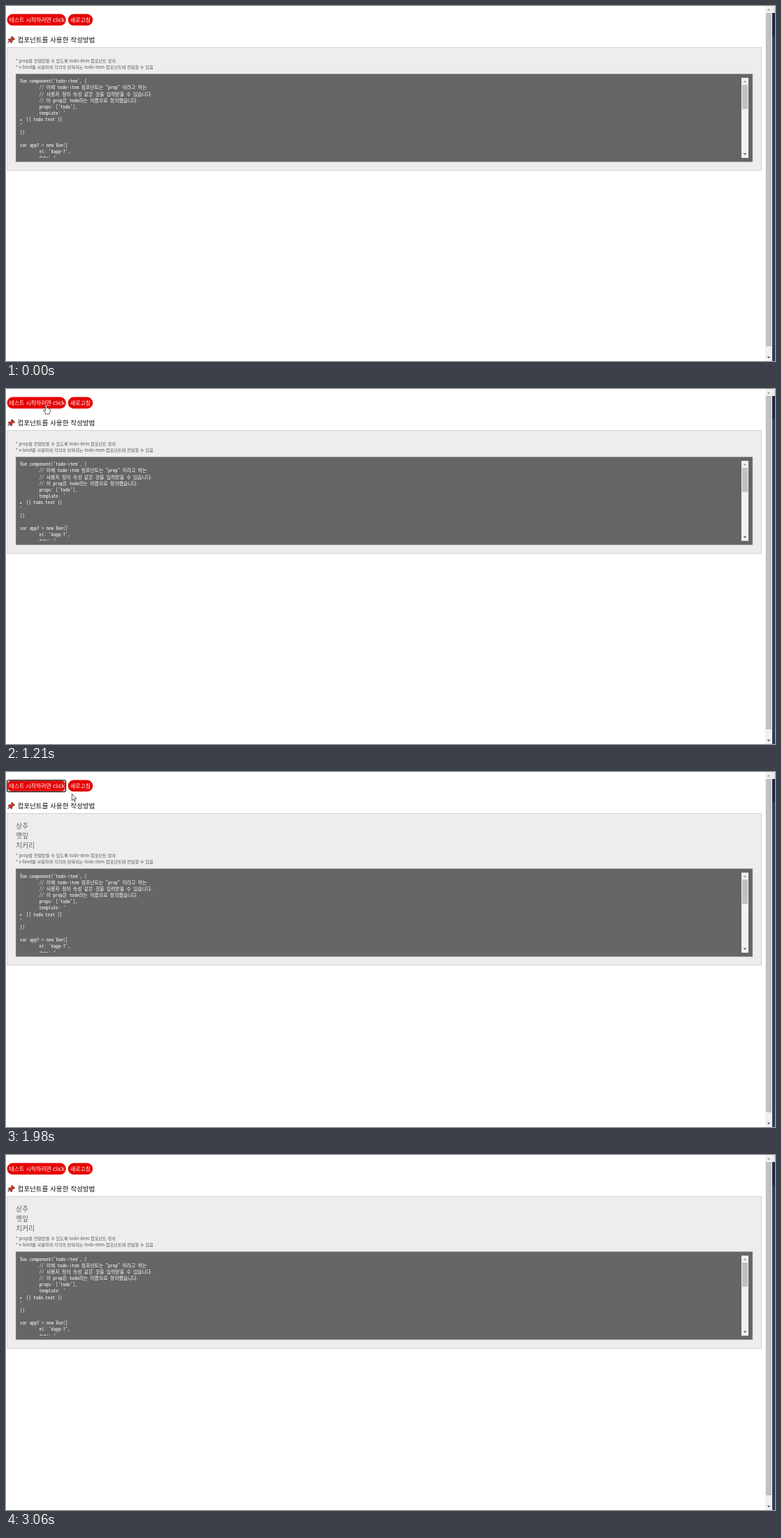
Animation of 1100 by 509 pixels, one loop 3140 ms. Source, as an HTML page:

```html
<!DOCTYPE html>
<html lang="ko">
<head>
<meta charset="utf-8">
<style>
html, body { margin: 0; width: 100%; height: 100%; overflow: hidden; background: #fff; }
svg { display: block; width: 100vw; height: 100vh; }
text { font-family: "Noto Sans CJK KR", "Noto Sans CJK", sans-serif; white-space: pre; }
.label { font-size: 7.9px; fill: #fff; }
.note { font-size: 6.2px; fill: #555; }
.item { font-size: 9.8px; fill: #666; }
.code { font-family: "Noto Sans Mono CJK KR", "Noto Sans CJK KR", monospace; font-size: 6.84px; fill: #fff; }
.track { fill: #f1f1f1; }
.thumb { fill: #c1c1c1; }
.cursor { fill: #fff; stroke: #222; stroke-width: .75; stroke-linejoin: round; }
</style>
</head>
<body>
<svg viewBox="0 0 1100 509">
  <defs>
    <clipPath id="codeClip"><rect x="15" y="103" width="1037" height="114.6"/></clipPath>
  </defs>

  <!-- page scrollbar and window edge -->
  <rect class="track" x="1086" width="10" height="509"/>
  <rect class="thumb" x="1087" y="10" width="8" height="478"/>
  <path d="M1088.7 6.5h4.6l-2.3-2.5z" fill="#9a9a9a"/>
  <path d="M1088.7 502.7h4.6l-2.3 2.5z" fill="#505050"/>
  <rect x="1096" width="4" height="509" fill="#2c3d5b"/>
  <rect x="1096" y="10" width="4" height="33" fill="#1c2a45"/>
  <rect x="1096" width="4" height="10" fill="#e6e8ea"/>

  <!-- buttons -->
  <rect x="1.5" y="11.6" width="84.2" height="16.5" rx="8.2" fill="#e60000"/>
  <rect x="88.7" y="11.6" width="35.4" height="16.5" rx="8.2" fill="#e60000"/>
  <g id="ring" fill="none">
    <rect x="2.3" y="12.5" width="82.4" height="15.2" rx="1.4" stroke="#fff" stroke-width=".6"/>
    <rect x="1.6" y="11.8" width="83.8" height="16.6" rx="1.8" stroke="#101010" stroke-width="1.3"/>
  </g>
  <text class="label" x="4.6" y="22.8">테스트 시작하려면 click</text>
  <text class="label" x="91.9" y="22.8">새로고침</text>

  <!-- heading -->
  <g stroke="#2a1512" stroke-width=".7" stroke-linejoin="round">
    <path d="M5.6 49.6L2.6 52.9" stroke="#444" stroke-width="1.1"/>
    <path d="M8.6 43.4l4 4-1 .9-1-.3-2 2.1.1 2-1 .9-4.7-4.7.9-1 2 .1 2.1-2-.3-1z" fill="#e0301e"/>
  </g>
  <text x="16.4" y="51.5" font-size="9.57" fill="#111">컴포넌트를 사용한 작성방법</text>

  <!-- panel -->
  <rect id="panel" x="1.8" y="59.3" width="1078.6" height="176.6" fill="#ededed" stroke="#c4c4c4" stroke-width=".7"/>
  <g id="list">
    <text class="item" x="13.9" y="81.4">상추</text>
    <text class="item" x="13.9" y="95.2">깻잎</text>
    <text class="item" x="13.9" y="109">치커리</text>
  </g>
  <g id="body">
    <text class="note" x="13.9" y="80.9">* prop을 전달받을 수 있도록 todo-item 컴포넌트 정의</text>
    <text class="note" x="13.9" y="89.5">* v-bind를 사용하여 각각의 반복되는 todo-item 컴포넌트에 전달할 수 있음</text>
    <rect id="box" x="14" y="97.2" width="1054" height="126.4" stroke="#bbb" stroke-width=".5"/>
    <g id="code" clip-path="url(#codeClip)"></g>
    <rect class="track" x="1052" y="103" width="10" height="114.8"/>
    <rect class="thumb" x="1053" y="113" width="8" height="34.6"/>
    <path d="M1054.7 109.5h4.6l-2.3-2.5z" fill="#9a9a9a"/>
    <path d="M1054.7 211.3h4.6l-2.3 2.5z" fill="#505050"/>
  </g>

  <!-- pointers, tip at the origin -->
  <path id="arrow" class="cursor" d="M.3 .3V9.9L2.5 7.9 4 11.4 5.4 10.8 3.9 7.4H6.8z"/>
  <path id="hand" class="cursor" d="M-1 1.2Q0-.4 1 1.2V5.2Q2 4.4 2.7 5.6 3.6 5 4.3 6.2 5.6 5.8 5.8 7.4V10.2L4.7 12.3V13.8H-1.2V12.4L-3.9 8.5Q-3.6 6.8-2 7.8L-1 8.8z"/>
</svg>
<script>
const LOOP = 3140, CLICK = 1380, BLUR = 3060, SHIFT = 41.3;
const $ = id => document.getElementById(id);

const indent = 47.4;
const lines = [
  [20, "Vue.component('todo-item', {"],
  [indent, '// 이제 todo-item 컴포넌트는 "prop" 이라고 하는'],
  [indent, "// 사용자 정의 속성 같은 것을 입력받을 수 있습니다."],
  [indent, "// 이 prop은 todo라는 이름으로 정의했습니다."],
  [indent, "props: ['todo'],"],
  [indent, "template: '"],
  [29, "{{ todo.text }}"],
  [20, "'"],
  [20, "})"],
  [20, ""],
  [20, "var app7 = new Vue({"],
  [indent, "el: '#app-7',"],
  [indent, "data: {"]
];

function add(tag, attrs, text = "") {
  const el = document.createElementNS("http://www.w3.org/2000/svg", tag);
  for (const key in attrs) el.setAttribute(key, attrs[key]);
  el.textContent = text;
  $("code").append(el);
}
lines.forEach(([x, text], i) => add("text", { class: "code", x, y: 110.3 + i * 9.17 }, text));
add("circle", { cx: 21.2, cy: 163.4, r: 1, fill: "#fff" });

// Pointer moves: start, end, number of positions, from, to, easing
const out = u => 1 - (1 - u) ** 1.6;
const ease = u => u * u * (3 - 2 * u);
const moves = [
  [70, 500, 7, [775, 437], [109, 72], out],
  [590, 590, 1, [93, 64]],
  [650, 1120, 7, [88, 57], [57.5, 23], out],
  [1210, 1210, 1, [57.5, 22.2]],
  [1380, 1380, 1, [55.7, 22.2]],
  [1670, 1980, 5, [55.5, 22.6], [94, 31], ease],
  [2070, 2140, 2, [230, 100], [510, 228], ease],
  [2220, 2450, 4, [660, 320], [986, 499], out]
];

function pointer(t) {
  if (t < 70 || t >= 2530) return null;
  const [start, end, count, from, to, curve] = moves.filter(m => m[0] <= t).pop();
  if (count === 1) return from;
  const last = count - 1;
  const step = Math.min(last, Math.floor((t - start) / (end - start) * last + 1e-6));
  const u = curve(step / last);
  return from.map((v, i) => v + (to[i] - v) * u);
}

const overButton = ([x, y]) => y > 11 && y < 28.2 && (x > 1 && x < 86 || x > 88 && x < 124);
const show = (id, on) => $(id).setAttribute("visibility", on ? "visible" : "hidden");

function draw(t) {
  const open = t >= CLICK;
  const shift = open ? SHIFT : 0;
  show("ring", open && t < BLUR);
  show("list", open);
  $("panel").setAttribute("height", 176.6 + shift);
  $("body").setAttribute("transform", `translate(0 ${shift})`);
  $("box").setAttribute("fill", open ? "#666" : "#646665");

  const pos = pointer(t);
  const hand = pos && overButton(pos);
  show("hand", hand);
  show("arrow", pos && !hand);
  if (pos) $(hand ? "hand" : "arrow").setAttribute("transform", `translate(${pos})`);
}

const begin = performance.now();
function tick() {
  draw((performance.now() - begin) % LOOP);
  requestAnimationFrame(tick);
}
draw(0);
requestAnimationFrame(tick);
</script>
</body>
</html>
```
